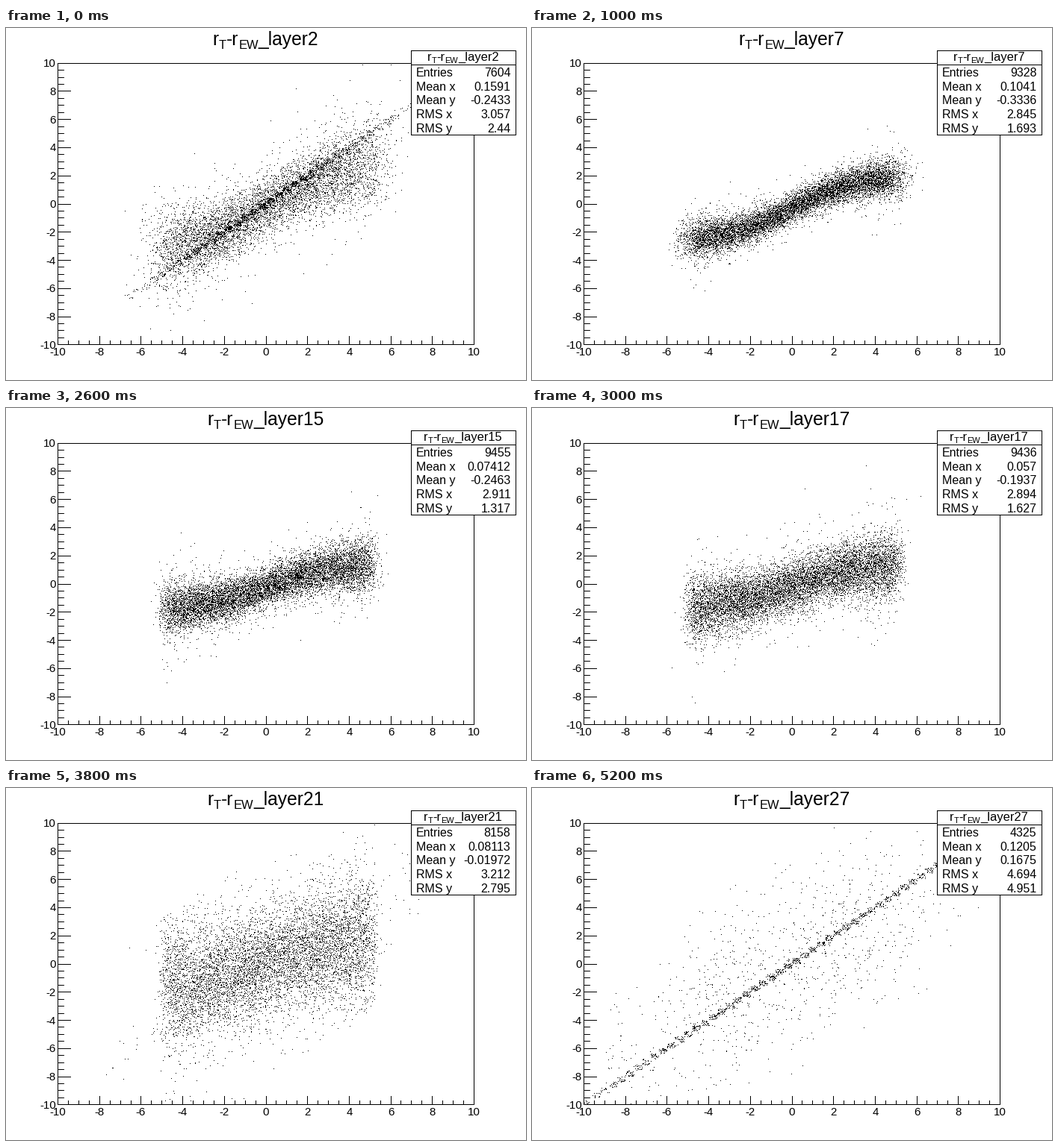
Recreate the animation shown at these times as a matplotlib script. Size 696x472 px, loop 5300 ms.

```python
import numpy as np
import matplotlib.pyplot as plt
from matplotlib.animation import FuncAnimation
from matplotlib.collections import LineCollection
from matplotlib.patches import Rectangle
from matplotlib.textpath import TextPath

W, H, DPI = 696, 472, 64
PX = 72 / DPI                      # points per pixel
FONT = "Liberation Sans"
LEFT, RIGHT, TOP, BOTTOM = 0.1 * W, 0.9 * W, 0.1 * H, 0.9 * H
BIN = 0.4

# Statistics shown at a few key layers; in between they are interpolated
KEYS = [2, 7, 11, 15, 19, 24, 27]
READOUT = {
    "Entries": [7604, 9328, 9446, 9455, 9417, 6270, 4325],
    "Mean x": [0.1591, 0.1041, 0.1857, 0.07412, 0.03988, 0.143, 0.1205],
    "Mean y": [-0.2433, -0.3336, -0.2869, -0.2463, -0.1412, 0.1625, 0.1675],
    "RMS x": [3.057, 2.845, 2.869, 2.911, 2.877, 3.714, 4.694],
    "RMS y": [2.44, 1.693, 1.328, 1.317, 1.937, 4.082, 4.951],
}


def px(x):
    return LEFT + (np.asarray(x) + 10) * (RIGHT - LEFT) / 20


def py(y):
    return BOTTOM - (np.asarray(y) + 10) * (BOTTOM - TOP) / 20


def stat(name, layer):
    return float(np.interp(layer, KEYS, READOUT[name]))


def advance(s, size):
    def ink(t):
        return TextPath((0, 0), t, size=100, prop={"family": FONT}).get_extents().width
    return (ink("x" + s + "x") - ink("xx")) * size / 100


def cloud(step, layer):
    """Scatter points of one layer, in data units."""
    rng = np.random.default_rng(40 + step)
    early = max(0, 1 - step / 5)            # inner layers
    late = max(0, (step - 13) / 13)         # outer layers

    n_diag = int(1600 * early + 1400 * late ** 3)
    n_stray = int(8 + 45 * early + 450 * late ** 3)
    n_body = int((stat("Entries", layer) - n_diag - n_stray) * (1 - 0.8 * late ** 3))

    # S-shaped band with noise that grows towards both ends
    amp = 1.5 + 2.3 * np.exp(-step / 5) + 1.8 * late ** 2
    bend = 3.1 + 1.4 * early + 2 * late
    noise = 0.5 + 0.55 * early + 2.7 / (1 + np.exp((19 - step) / 2.2))
    smear = 0.15 + 0.6 * np.exp(-step / 8) + 0.5 * late ** 3
    x = 0.1 + rng.uniform(-5, 5, n_body) + rng.normal(0, smear, n_body)
    flare = 1 + 0.5 * np.minimum((x / 5) ** 2, 1.3) * (1 - late)
    tail = np.where(rng.random(n_body) < 0.09, 1.9, 1)
    y = stat("Mean y", layer) + amp * np.tanh(x / bend)
    y += noise * flare * tail * rng.normal(size=n_body)

    reach = 7 + 3 * late
    far_x = rng.uniform(1 - reach, reach - 1, n_stray)
    far_y = 0.8 * far_x + rng.normal(0, 3, n_stray)
    x, y = np.append(x, far_x), np.append(y, far_y)
    keep = np.abs(y - x) < 8.5
    x, y = x[keep], y[keep]

    # entries on the diagonal fill whole square bins
    d = rng.normal(0.1, 2.9 + 3.3 * late, 2 * n_diag)
    d = d[np.abs(d) < reach][:n_diag]
    cell = np.floor(d / BIN) * BIN
    x = np.append(x, cell + BIN * rng.random(d.size))
    y = np.append(y, cell + BIN * rng.random(d.size))

    inside = (np.abs(x) < 10) & (np.abs(y) < 10)
    return x[inside], y[inside]


fig = plt.figure(figsize=(W / DPI, H / DPI), dpi=DPI, facecolor="white")
ax = fig.add_axes([0, 0, 1, 1])
ax.set_xlim(0, W)
ax.set_ylim(H, 0)
ax.axis("off")


def text(x, y, s, size, ha="left"):
    return ax.text(x, y, s, fontsize=size * PX, family=FONT, ha=ha,
                   va="baseline", color="black", zorder=5)


def lines(segments, z):
    """Hairlines that fill whole pixels."""
    snapped = np.floor(np.array(segments) + 1e-6) + 0.25
    ax.add_collection(LineCollection(snapped, colors="black", linewidths=PX,
                                     antialiaseds=False, zorder=z))


class Heading:
    """Centred line r_T-r_EW_layerN with lowered subscripts."""

    def __init__(self, cx, base, size):
        self.cx = cx
        sub = 0.67 * size
        self.sizes = [size, sub, size, sub, size]
        self.parts = [text(0, base + (0.2 * size if s == sub else 0), "", s)
                      for s in self.sizes]

    def show(self, layer):
        words = ["r", "T", "-r", "EW", f"_layer{layer}"]
        widths = [advance(w, s) for w, s in zip(words, self.sizes)]
        x = self.cx - sum(widths) / 2
        for part, word, width in zip(self.parts, words, widths):
            part.set_text(word)
            part.set_x(x)
            x += width


def draw_axes():
    segs = [[(LEFT, TOP), (RIGHT, TOP)], [(RIGHT, TOP), (RIGHT, BOTTOM)],
            [(LEFT, BOTTOM), (RIGHT, BOTTOM)], [(LEFT, TOP), (LEFT, BOTTOM)]]
    for k in range(41):
        v = -10 + k / 2
        major = k % 4 == 0
        x, y = float(px(v)), float(py(v))
        segs.append([(x, BOTTOM), (x, BOTTOM - (11 if major else 5))])
        segs.append([(LEFT, y), (LEFT + (17 if major else 8), y)])
        if major:
            text(x - (0.5 if v < 0 else 0), 439, f"{v:.0f}", 15, "center")
            text(67, y + 5, f"{v:.0f}", 15, "right")
    lines(segs, 2)


def draw_box():
    x0, x1, y0, y1 = 542, 682, 30, 143
    ax.add_patch(Rectangle((x0 + 0.25, y0 + 0.25), x1 - x0, y1 - y0,
                           fc="white", ec="none", zorder=3))
    lines([[(x0, y0), (x1, y0)], [(x0, y1), (x1, y1)], [(x0, y0), (x0, y1)],
           [(x1, y0), (x1, y1)], [(x0, 49), (x1, 49)]], 4)
    values = {}
    for i, name in enumerate(READOUT):
        base = 65 + 18.7 * i
        text(549, base, name, 16)
        values[name] = text(675.5, base, "", 16, "right")
    return values


draw_axes()
dots, = ax.plot([], [], ",", color="black", zorder=1)
values = draw_box()
headings = [Heading(347.5, 23, 24.6), Heading(611.5, 44, 16.5)]


def update(i):
    step = i // 2
    layer = min(step + 2, 27)
    x, y = cloud(step, layer)
    dots.set_data(px(x), py(y))
    for heading in headings:
        heading.show(layer)
    for name, label in values.items():
        label.set_text(f"{stat(name, layer):.4g}")
    return [dots, *values.values(), *headings[0].parts, *headings[1].parts]


anim = FuncAnimation(fig, update, frames=53, interval=100, repeat=True,
                     repeat_delay=0, blit=False)
plt.show()
```
